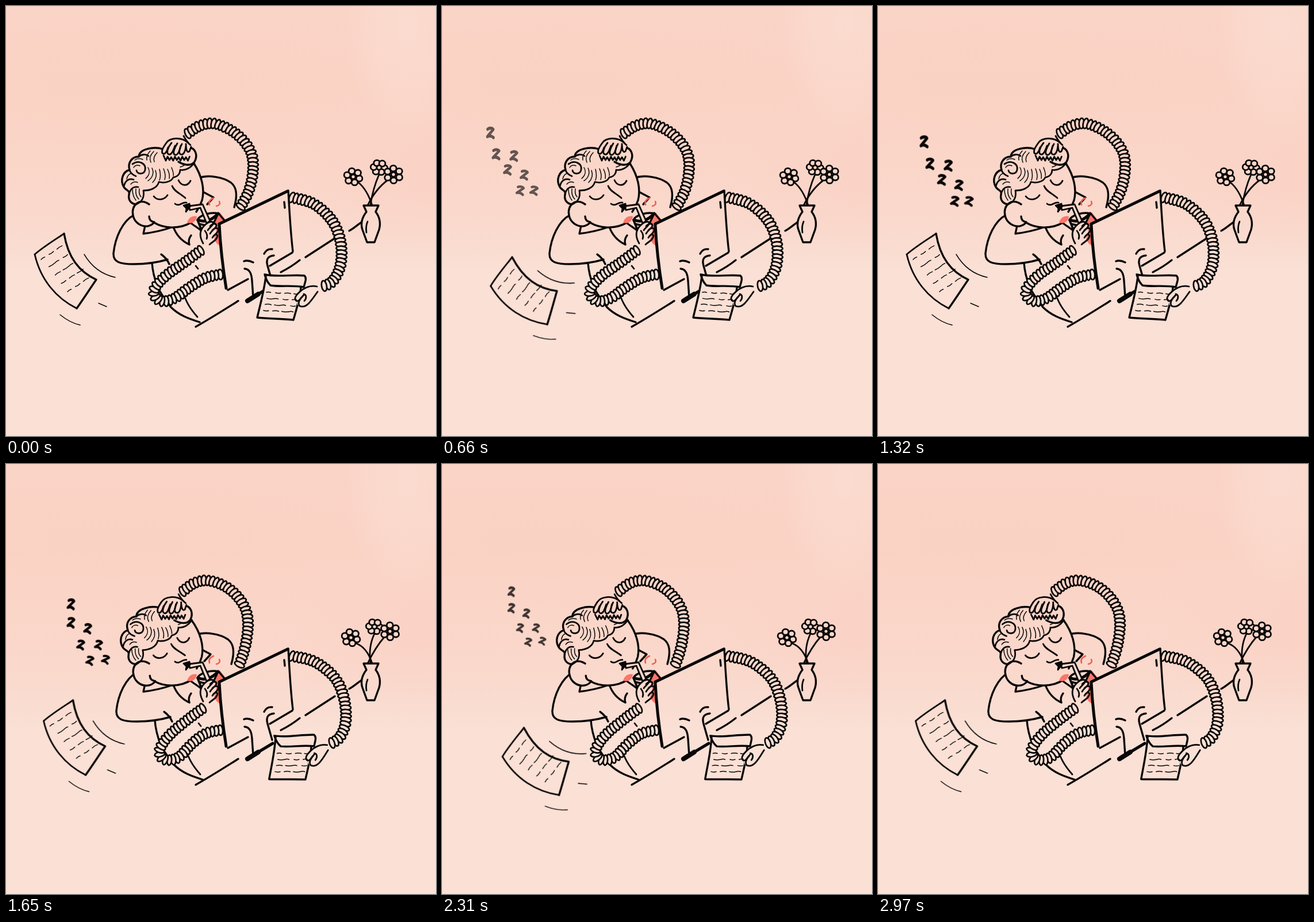
Write an HTML page that moves like this. It is 748 px wide and 748 px high and loops after 3300 ms.

```html
<!DOCTYPE html>
<html lang="en">
<head>
<meta charset="utf-8">
<title>Nap at the desk</title>
<style>
html, body { margin: 0; width: 100%; height: 100%; overflow: hidden; }
body {
  background:
    radial-gradient(ellipse 110px 200px at 700px 30px, rgba(251,224,213,.6), rgba(251,224,213,.35) 60%, transparent),
    radial-gradient(ellipse 240px 130px at 730px 310px, rgba(249,198,184,.25), transparent),
    radial-gradient(ellipse 420px 120px at 190px 130px, rgba(250,205,186,.2), transparent),
    linear-gradient(#fad4c7, #fad3c5 20%, #fad7ca 42%, #fadace 52%, #fae0d5 62%, #fae0d5);
}
svg { display: block; width: 100%; height: 100%; }
path, ellipse, circle { fill: none; stroke: #080606; stroke-width: 3.4; stroke-linecap: round; stroke-linejoin: round; }
.bg { fill: url(#wash); }
.blank { fill: url(#wash); stroke: none; }
.ink { fill: #080606; }
.red { fill: #f9776a; stroke: none; }
.redline { stroke: #f0604f; stroke-width: 2.6; }
.ring { fill: url(#wash); stroke-width: 2.7; }
.thin { stroke-width: 1.5; }
.mid { stroke-width: 2.8; }
.bold { stroke-width: 5; }
.z path { stroke-width: 4.2; }

.even { animation: even .66s step-end infinite; }
.odd { animation: odd .66s step-end infinite; }
.paper { animation: paper 3.3s step-end infinite; }
.z { animation: z 3.3s step-end infinite; }
@keyframes even { 0% { visibility: visible } 50%, 100% { visibility: hidden } }
@keyframes odd { 0% { visibility: hidden } 50%, 100% { visibility: visible } }
@keyframes paper {
  0%, 40%, 80% { transform: translate(101px, 396px) }
  10%, 50%, 90%, 100% { transform: translate(116.5px, 411px) }
  20%, 60% { transform: translate(122px, 437px) rotate(-18deg) }
  30%, 70% { transform: translate(142.5px, 459px) rotate(-18deg) }
}
@keyframes z {
  0% { opacity: 0 }
  10% { opacity: .3; transform: translate(-1px, 27px) scale(1.04) }
  20% { opacity: .62; transform: none }
  30% { opacity: .82; transform: none }
  40% { opacity: 1; transform: translate(-3px, 17px) scale(1.03) }
  50% { opacity: 1; transform: translate(4px, 29px) scale(.94) }
  60% { opacity: .95; transform: translate(8px, 2px) scale(.9) }
  70% { opacity: .78; transform: translate(8.5px, 2px) scale(.84) }
  80% { opacity: .4; transform: translate(5px, 19px) scale(.86) }
  90%, 100% { opacity: 0 }
}
</style>
</head>
<body>
<svg id="stage" viewBox="0 0 748 748"></svg>
<script>
const line = (d, cls = '') => `<path class="${cls}" d="${d}"/>`;
const lines = (cls, ...ds) => ds.map(d => line(d, cls)).join('');
const group = (transform, ...parts) => `<g transform="${transform}">${parts.join('')}</g>`;
const round = n => n.toFixed(1);

// Catmull-Rom point between b and c
function spline(a, b, c, d, t) {
  return [0, 1].map(k => b[k] + .5 * t * (c[k] - a[k] +
    t * (2 * a[k] - 5 * b[k] + 4 * c[k] - d[k] + t * (3 * (b[k] - c[k]) + d[k] - a[k]))));
}

// Tilted ellipse in stage coordinates, so the wash behind it lines up
function ring(x, y, along, across, turn) {
  const dx = across * -Math.sin(turn), dy = across * Math.cos(turn);
  const arc = `A${along} ${across} ${round(turn * 180 / Math.PI)} 0 1 `;
  return line(`M${round(x - dx)} ${round(y - dy)}${arc}${round(x + dx)} ${round(y + dy)}${arc}${round(x - dx)} ${round(y - dy)}Z`, 'ring');
}

// Ribbed hose: overlapping rings at even distances along a curve
function hose(pts, width, gap = 7.1) {
  let out = '', last = pts[0], left = 0;
  for (let i = 0; i < pts.length - 1; i++) {
    for (let s = 1; s <= 80; s++) {
      const p = spline(pts[i - 1] || pts[i], pts[i], pts[i + 1], pts[i + 2] || pts[i + 1], s / 80);
      const dx = p[0] - last[0], dy = p[1] - last[1];
      left -= Math.hypot(dx, dy);
      if (left <= 0) {
        out += ring(...p, 4.4, width / 2, Math.atan2(dy, dx) + .12);
        left += gap;
      }
      last = p;
    }
  }
  return out;
}

function flower(x, y, turn, r = 10) {
  let out = '';
  for (let i = 0; i < 6; i++) {
    const a = turn + i * Math.PI / 3;
    out += `<ellipse class="bg mid" cx="${x + r * 1.1 * Math.cos(a)}" cy="${y + r * Math.sin(a)}" rx="5.4" ry="5.2"/>`;
  }
  return out + `<circle class="bg mid" cx="${x}" cy="${y}" r="4"/>`;
}

// Rows of handwriting dashes along u, stacked along v
function scribble(x, y, u, v, rows, cols) {
  let d = '';
  for (let r = 0; r < rows; r++) for (let c = 0; c < cols; c++) {
    const n = (r * 7 + c * 5) % 4, k = c + n * .06, len = .5 + n * .1;
    const px = x + u[0] * k + v[0] * r, py = y + u[1] * k + v[1] * r;
    d += `M${round(px)} ${round(py)}q${round(u[0] * len * .5)} ${round(u[1] * len * .5 - 1.5 + n % 2 * 3)} ${round(u[0] * len)} ${round(u[1] * len)}`;
  }
  return line(d, 'thin');
}

const torso = lines('',
  'M222 364C203 374 190 402 187 430C186 446 199 449 222 449C245 449 264 446 281 441',
  'M270 432C277 437 281 442 284 449',
  'M254 447C255 462 258 474 264 489C270 503 280 514 287 524C301 538 318 544 337 550') +
  lines('mid', 'M307 494C312 512 318 524 333 541', 'M330 452L334 457');

const shoulder = lines('', 'M336 299C352 293 378 298 391 307C403 316 402 333 397 350',
  'M344 324L361 333L350 345');

const collar = lines('', 'M242 382L239 396C257 394 274 390 291 384',
  'M291 384C296 398 306 409 319 415C317 409 318 404 322 399', 'M322 378C330 384 334 386 340 391');

const head = [
  line('M224 344C216 352 220 382 244 383L258 378C285 390 310 387 322 377C338 360 348 335 340 305L328 272L310 248L250 247L213 280L203 305L214 337Z', 'blank'),
  lines('',
    'M327 274C341 296 346 319 341 338C338 347 335 352 331 358',
    'M258 377C273 386 300 390 323 376',
    'M249 345C232 333 217 347 221 364C224 382 247 390 258 376C252 375 249 371 249 366',
    'M273 249C258 244 232 248 231 262C219 262 211 273 215 285C203 288 198 303 205 315C209 321 216 321 214 328C212 338 218 344 226 345'),
  lines('mid',
    'M226 345C237 341 241 332 239 321C251 321 263 317 266 306C277 309 288 305 291 298C300 297 303 290 303 285C312 287 322 281 327 273',
    'M220 275C231 267 244 274 242 285C240 294 228 293 227 286',
    'M215 286C217 291 221 294 226 296', 'M231 262C235 258 243 257 248 261',
    'M205 314C207 304 214 299 222 302', 'M214 328C216 318 222 313 230 315',
    'M257 331C263 339 275 338 281 329', 'M300 303C305 314 316 314 321 304',
    'M289 313C292 322 303 326 312 334', 'M294 344C302 350 306 340 314 342'),
  lines('thin',
    'M251 252C246 257 244 262 245 268', 'M257 253C251 259 249 266 252 272', 'M263 255C258 260 256 266 258 271',
    'M247 281C251 288 249 295 243 300', 'M254 282C258 290 255 299 247 304', 'M260 286C263 294 261 301 255 307',
    'M267 284C269 292 269 298 267 303', 'M274 283C277 290 278 296 276 302', 'M281 284C284 290 285 295 284 300',
    'M288 281C290 286 292 291 291 295', 'M220 319C220 327 222 333 226 338', 'M226 318C225 326 227 332 231 336',
    'M232 318C231 324 232 329 235 332', 'M210 301C211 295 215 291 219 291', 'M222 281C224 277 229 276 233 278',
    'M217 310C220 306 225 305 229 307', 'M320 256C323 260 322 267 318 272', 'M314 273C311 277 307 279 303 280',
    'M224 268C228 265 233 265 238 267')
].join('');

function bristles() {
  let d = 'M274 260';
  for (let i = 0; i < 7; i++) d += `L${278 + i * 6.4} ${269 - i % 2}L${281 + i * 6.4} ${262 + i % 2}`;
  return line(d, 'mid');
}

const brush = [
  line('M318 246C330 247 334 260 328 271C322 279 310 277 300 271', 'bg'),
  line('M270 256L274 246C276 235 287 229 299 231L318 236L322 249L318 262L274 265Z', 'blank'),
  bristles(),
  lines('mid',
    'M317 238C305 227 285 229 279 238C274 245 270 251 272 256C276 260 280 253 282 246',
    'M288 238C282 245 278 256 283 258C288 260 291 251 294 243',
    'M298 239C293 247 289 257 294 259C299 260 302 252 304 243',
    'M306 240C301 248 300 257 304 258C309 260 312 252 313 244',
    'M313 240C313 250 315 256 319 253L322 245',
    'M309 226C312 232 316 238 321 242')
].join('');

const drink = [
  line('M362 366L372 359L382 372L373 378L376 417C369 418 364 411 361 402Z', 'red'),
  line('M315 377C317 369 324 364 332 366C331 374 325 380 315 377Z', 'red'),
  lines('redline', 'M354 346C352 340 356 336 361 334', 'M366 348C371 347 373 344 371 340'),
  line('M333 372C338 363 357 358 369 361L362 376L361 392L343 398Z', 'bg'),
  line('M334 372C347 378 360 371 369 361', 'bold'),
  line('M333 372L343 396M370 361L380 373M336 379L364 386'),
  line('M318 348L342 345L355 374L349 378L338 351L320 355Z', 'bg mid'),
  line('M309 347L319 344L320 349L313 358L314 352Z', 'ink mid'),
  line('M343 411C335 400 336 390 346 381C352 374 359 376 364 381L366 394L361 408L352 415Z', 'blank'),
  lines('mid',
    'M343 413C336 401 336 391 345 382C351 376 356 374 360 376C362 381 354 385 351 390',
    'M355 383C361 377 366 378 366 382C365 387 358 390 355 396',
    'M359 390C365 384 370 386 369 391C367 396 362 398 359 403',
    'M361 400C366 395 369 398 367 403C364 409 359 410 354 415', 'M346 391C350 396 351 400 349 405')
].join('');

const desk = lines('', 'M330 558C355 544 380 528 404 513', 'M478 463C490 457 501 450 511 442',
  'M521 437L572 404', 'M597 391C604 388 612 380 620 375');

const monitor = [
  line('M371 379L491 322L498 428L384 493Z', 'blank'),
  line('M429 478L458 458L463 480L430 505Z', 'blank'),
  lines('bold', 'M371 379L490 322', 'M371 381C373 420 378 460 383 491'),
  lines('', 'M491 321C493 358 495 394 499 427', 'M386 494L421 475', 'M459 452L498 429',
    'M415 457C424 458 427 465 428 478L430 507', 'M466 434C455 435 452 441 455 452L463 480',
    'M414 444C419 442 424 443 430 446', 'M449 431C452 425 456 422 463 423', 'M484 341L485 351'),
  '<path d="M420 513L439 501" style="stroke-width:8"/>', lines('bold', 'M439 501L464 486')
].join('');

const sheet = [
  line('M452 468L437 542C460 545 480 546 500 546L512 490L520 470Z', 'blank'),
  lines('', 'M452 470C449 496 442 520 437 542C458 544 480 544 500 546C505 528 511 510 513 490',
    'M450 467C471 472 495 467 519 469C524 473 520 481 518 489C499 485 477 489 460 486C455 481 452 475 450 467'),
  scribble(453, 498, [15, .8], [-2, 10.5], 4, 4),
  line('M541 488C531 485 522 490 515 495L505 505L507 520L519 523C529 518 535 505 541 496Z', 'blank'),
  lines('mid', 'M541 488C529 485 518 491 511 497C505 502 500 509 505 513C511 515 513 506 519 502',
    'M516 505C510 510 507 518 511 522C523 527 532 511 542 497', 'M518 501C523 502 523 509 519 513')
].join('');

const vase = line('M622 347L648 347L643 358C650 367 652 378 649 389L641 411L628 411L620 389C616 377 620 367 627 358Z', 'bg') +
  line('M629 375C626 382 626 388 627 394', 'mid');

function bouquet(a, b, c) {
  return lines('mid',
    `M${a[0] + 9} ${a[1] + 10}Q628 319 637 347`,
    `M${b[0]} ${b[1] + 12}Q${b[0] - 11} 318 634 346`,
    `M${c[0] - 9} ${c[1] + 9}Q643 318 629 347`) +
    flower(...a, .3) + flower(...b, .1, 8.5) + flower(...c, .5, 10.5);
}

// Seven letters, placed around the middle of the cluster
function snore(cx, cy, pts, tilt) {
  const marks = pts.map(([x, y], i) => group(`translate(${x - cx} ${y - cy}) rotate(${tilt + i * 2}) scale(1 ${1.3 - i * .05})`,
    line('M-5 -5C-2 -7 3 -7 5 -5L-5 5C-1 3 3 4 6 6')));
  return group(`translate(${cx} ${cy})`, `<g class="z">${marks.join('')}</g>`);
}

function pose(name, p) {
  return `<g class="${name}">` + [
    group(p.torso, torso), group(p.shoulder, shoulder), collar,
    hose(p.low, 18), group(p.head, head),
    hose(p.top, 18), group(p.brush, brush),
    drink, desk, bouquet(...p.flowers), vase,
    hose(p.right, 18.5), monitor, group(p.sheet, sheet), snore(...p.snore)
  ].join('') + '</g>';
}

const even = pose('even', {
  torso: '', shoulder: '', head: '', brush: '', sheet: '',
  low: [[373, 467], [347, 473], [320, 489], [292, 509], [268, 513], [257, 496], [276, 471], [312, 445], [343, 422]],
  top: [[316, 222], [338, 208], [365, 205], [400, 222], [424, 250], [430, 280], [423, 320], [405, 355]],
  right: [[497, 333], [535, 344], [567, 373], [582, 410], [582, 450], [568, 479], [547, 489]],
  flowers: [[604, 297], [649, 281], [674, 293]],
  snore: [122, 271, [[84, 221], [94, 258], [125, 261], [114, 285], [143, 294], [136, 321], [160, 321]], 2]
});

const odd = pose('odd', {
  torso: 'translate(5 -1)', shoulder: 'translate(-5 -2)', head: 'rotate(-3 290 345)',
  brush: 'translate(-8 1) rotate(-2 297 250)', sheet: 'translate(19 4) rotate(-3 480 510)',
  low: [[373, 463], [347, 469], [323, 487], [299, 511], [275, 514], [267, 498], [284, 472], [318, 443], [348, 421]],
  top: [[307, 222], [328, 207], [354, 203], [388, 217], [413, 245], [421, 276], [416, 318], [404, 355]],
  right: [[497, 334], [537, 344], [572, 372], [588, 408], [591, 447], [581, 475], [564, 487]],
  flowers: [[600, 302], [641, 283], [668, 291]],
  snore: [139, 263, [[107, 212], [107, 246], [138, 257], [125, 287], [158, 287], [142, 316], [171, 314]], 8]
});

const paper = '<g class="paper">' + [
  lines('mid', 'M-51 36C-36 23 -18 12 0 0', 'M-51 36C-41 80 -14 112 22 130'),
  lines('', 'M0 0C7 42 26 66 56 80C45 96 34 113 22 130'),
  scribble(-40, 45, [13, -8.5], [11.5, 14], 5, 3),
  lines('thin', 'M35 36C48 58 66 71 89 76', 'M60 121L74 127', 'M-7 141C4 150 15 156 28 159')
].join('') + '</g>';

document.getElementById('stage').innerHTML = `
  <defs><linearGradient id="wash" gradientUnits="userSpaceOnUse" x1="0" y1="0" x2="0" y2="748">
    <stop offset="0" stop-color="#fad4c7"/><stop offset=".2" stop-color="#fad3c5"/>
    <stop offset=".42" stop-color="#fad7ca"/><stop offset=".52" stop-color="#fadace"/>
    <stop offset=".62" stop-color="#fae0d5"/>
  </linearGradient></defs>` + paper + even + odd;
</script>
</body>
</html>
```
